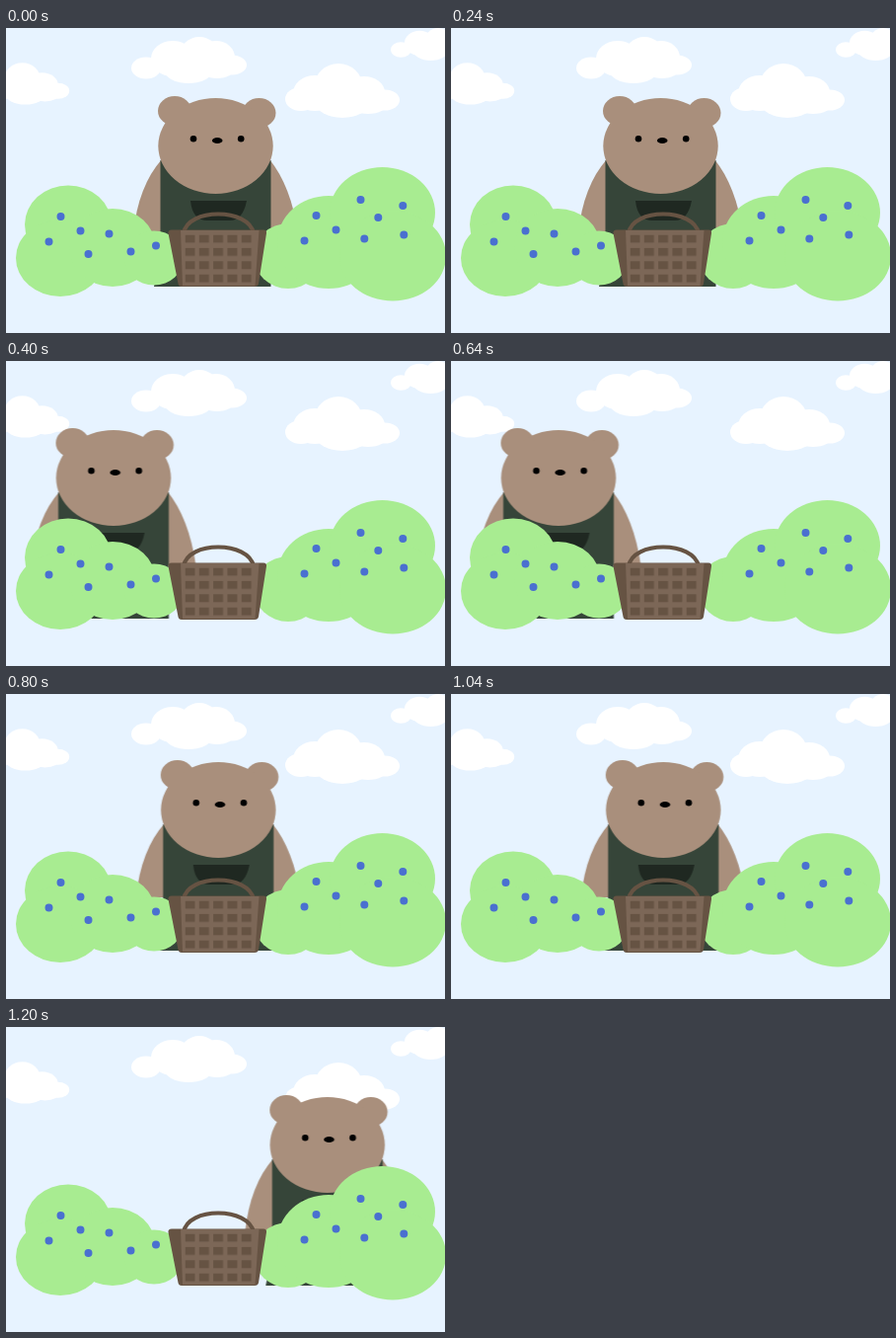
Write an HTML page that moves like this. It is 445 px wide and 309 px high and loops after 1600 ms.

```html
<!DOCTYPE html>
<html lang="en">
<head>
<meta charset="utf-8">
<title>Bear picking berries</title>
<style>
  html, body { margin: 0; width: 100%; height: 100%; overflow: hidden; background: #e7f3ff; }
  svg { display: block; width: 100%; height: 100%; }
  .cloud { fill: #fff; }
  .fur { fill: #a98f7c; }
  .apron { fill: #364539; }
  .pocket { fill: #1f2821; }
  .bush { fill: #a8ec91; }
  .berries { fill: none; stroke: #4a70d0; stroke-width: 8; stroke-linecap: round; }
  #bear { animation: hop 1600ms step-end infinite; }
  @keyframes hop {
    0%   { transform: translate(0, 0); }
    25%  { transform: translate(-103.5px, -1px); }
    50%  { transform: translate(2.7px, -2px); }
    75%  { transform: translate(113.3px, 0); }
    100% { transform: translate(0, 0); }
  }
</style>
</head>
<body>
<svg viewBox="0 0 445 309">
  <defs>
    <g id="wide-cloud">
      <ellipse cx="142" cy="40.500" rx="15" ry="11"/>
      <ellipse cx="169" cy="31" rx="22" ry="18"/>
      <ellipse cx="196" cy="28" rx="20" ry="19"/>
      <ellipse cx="213" cy="30" rx="19" ry="17"/>
      <ellipse cx="229" cy="37.500" rx="15" ry="10"/>
      <ellipse cx="185" cy="42" rx="25" ry="14"/>
      <ellipse cx="214" cy="41" rx="18" ry="10"/>
    </g>
    <g id="tall-cloud">
      <ellipse cx="299" cy="72" rx="16" ry="12"/>
      <ellipse cx="313" cy="66" rx="22" ry="18"/>
      <ellipse cx="337" cy="58" rx="24" ry="22"/>
      <ellipse cx="363" cy="65" rx="21" ry="16"/>
      <ellipse cx="384" cy="73" rx="15" ry="10.500"/>
      <ellipse cx="341" cy="76" rx="27" ry="15"/>
      <ellipse cx="367" cy="76" rx="20" ry="11"/>
    </g>
    <pattern id="weave" x="181.500" y="209.500" width="14.300" height="13.400" patternUnits="userSpaceOnUse">
      <rect width="10" height="8" fill="#665343"/>
    </pattern>
  </defs>

  <g class="cloud">
    <use href="#wide-cloud"/>
    <use href="#wide-cloud" transform="translate(301 -6.300) scale(.7)"/>
    <use href="#tall-cloud"/>
    <use href="#tall-cloud" transform="translate(-243 7.500) scale(.77)"/>
  </g>

  <g id="bear">
    <path class="fur" d="M158 133Q134 160 129 208H296Q289 160 267 133Z"/>
    <path class="apron" d="M156.500 134H268.500V262H150Q156.500 235 156.500 205Z"/>
    <path class="pocket" d="M187 175H244Q240 195 227 195H204Q189 195 187 175Z"/>
    <g class="fur">
      <ellipse cx="171" cy="84" rx="17" ry="15"/>
      <ellipse cx="256.500" cy="86" rx="17" ry="15"/>
      <ellipse cx="212.500" cy="119.500" rx="58.200" ry="48.500"/>
    </g>
    <circle cx="190" cy="112.200" r="3.300"/>
    <circle cx="238.200" cy="112.200" r="3.300"/>
    <ellipse cx="214.200" cy="114" rx="5.300" ry="3"/>
  </g>

  <g class="bush">
    <ellipse cx="63" cy="199" rx="44" ry="39.500"/>
    <ellipse cx="55" cy="233" rx="45" ry="39"/>
    <ellipse cx="108" cy="222.500" rx="44" ry="39.500"/>
    <ellipse cx="150" cy="233" rx="30" ry="27.500"/>
    <ellipse cx="286" cy="231" rx="35" ry="33"/>
    <ellipse cx="327" cy="217" rx="52" ry="47"/>
    <ellipse cx="381.500" cy="187" rx="53.500" ry="46"/>
    <ellipse cx="392" cy="231" rx="54" ry="45.500"/>
  </g>
  <path class="berries" d="M55.500 191h0M43.500 216.500h0M75.500 205.500h0M83.500 229h0M104.500 208.500h0M126.500 226.500h0M152 220.500h0M302.500 215.500h0M314.500 190h0M334.500 204.500h0M359.500 174h0M363.300 213.500h0M377.300 192h0M402.300 180h0M403.300 209.500h0"/>

  <g fill="#665343">
    <path d="M180 208C184 182 246 182 251 208" fill="none" stroke="#665343" stroke-width="4"/>
    <path d="M168 204.500H261Q264.500 204.500 264 208L256 259Q255.500 262 252 262H178Q175 262 174.500 259L164.500 208Q164 204.500 168 204.500Z"/>
    <path d="M177 205H256.500L252.500 261H179Z" fill="#7c6757"/>
    <rect x="181.500" y="209.500" width="68" height="49" fill="url(#weave)"/>
  </g>
</svg>
</body>
</html>
```
